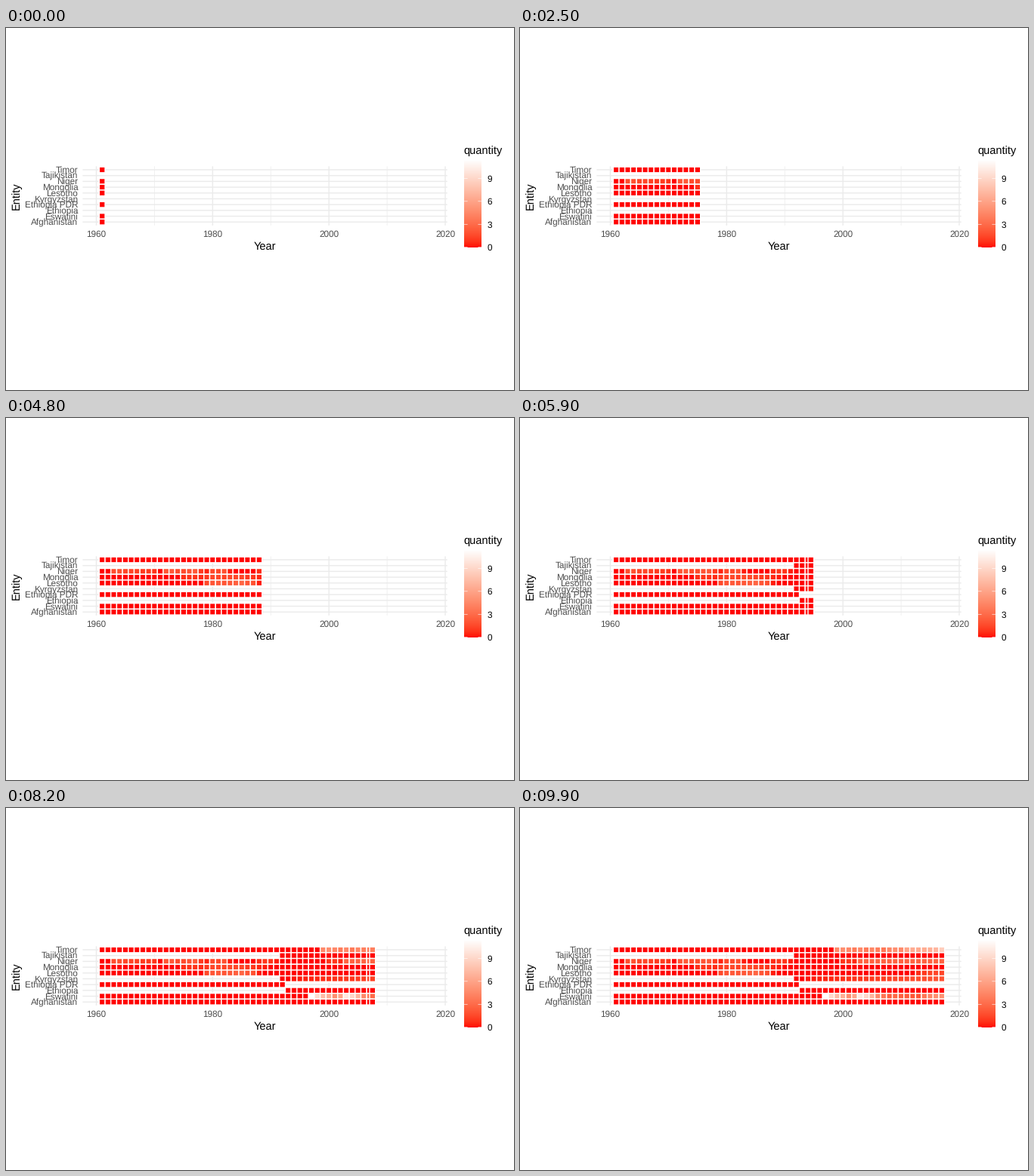
Animation, 672 px wide and 480 px high, one loop 10 s. Source, as a matplotlib script:

```python
import numpy as np
import matplotlib.pyplot as plt
from matplotlib.animation import FuncAnimation
from matplotlib.collections import LineCollection, PolyCollection

W, H, DPI = 672, 480, 96
FRAMES, INTERVAL = 100, 100
FIRST, LAST = 1961, 2017
CELL = 7.692            # pixels per year and per row
X1960, ROW_TOP = 119.5, 188.0
PANEL = (101.4, 583.7, 183.4, 261.8)
BAR = (606, 629, 290.7, 175.5)
TOP_VALUE = 11.35
LINE = 1.42

plt.rcParams["font.family"] = "Liberation Sans"
plt.rcParams["text.hinting"] = "none"

YEARS = np.arange(FIRST, LAST + 1)
ROWS = ["Timor", "Tajikistan", "Niger", "Mongolia", "Lesotho", "Kyrgyzstan",
        "Ethiopia PDR", "Ethiopia", "Eswatini", "Afghanistan"]
SPAN = {"Tajikistan": (1992, LAST), "Kyrgyzstan": (1992, LAST),
        "Ethiopia PDR": (FIRST, 1992), "Ethiopia": (1993, LAST)}

# Runs of yearly values, keyed by their first year; all other years are zero.
RUNS = {
    "Timor": {1999: [4.5, 4.8, 4.5, 3.8, 4.5, 3.8, 4.4, 4, 3.6, 4.4, 4.8,
                     4.6, 6, 6.4, 6.4, 6.5, 6.7, 7, 8.4]},
    "Niger": {1963: [1.7, 1.8, 1.4, 1.4, 1.2, 1, 1, .8],
              1972: [2, 2.2, 1.6, 1.6, 1.9, 2.1, 1, .4, 1.5, 1.5, 1.8, .3],
              1988: [.6, .9, .8, .3],
              2000: [.8, .9, .5] + [2.6] * 15},
    "Mongolia": {1975: [.7, .8, .8, .6, 1, 1.4, 1.5, 1.3, 1.5, 1.5, 1.4,
                        1, .9, .5, .3]},
    "Lesotho": {1979: [1.5, 2, 2.2, 2, 2.2, 2.5, 2.7, 2, 1.8, .3],
                2013: [.6, 1, 1.3, 1.4, 1.4]},
    "Kyrgyzstan": {1994: list(np.linspace(.2, 1.9, 24))},
    "Eswatini": {1997: [11.3, 9.2, 7.4, 6.6, 4.8, 6, 10, 9, 7, 4.5, 3.5,
                        2.5, 2.8, 2.5, 2.3, 2, 2, 3.6, 4.4, 4.8, 5]},
}


def make_series(name):
    values = np.zeros(len(YEARS))
    for start, run in RUNS.get(name, {}).items():
        values[start - FIRST:start - FIRST + len(run)] = run
    return values


SERIES = {name: make_series(name) for name in ROWS}


def shade(values):
    """Red to white, blended in CIE Lab."""
    t = np.clip(np.atleast_1d(values) / TOP_VALUE, 0, 1)[:, None]
    lab = (1 - t) * np.array([53.24, 80.09, 67.2]) + t * np.array([100, 0, 0])
    fy = (lab[:, 0] + 16) / 116
    f = np.stack([fy + lab[:, 1] / 500, fy, fy - lab[:, 2] / 200], axis=1)
    xyz = np.where(f > 6 / 29, f ** 3, 3 * (6 / 29) ** 2 * (f - 4 / 29))
    xyz = xyz * np.array([.95047, 1, 1.08883])
    to_rgb = np.array([[3.2406, -1.5372, -.4986],
                       [-.9689, 1.8758, .0415],
                       [.0557, -.2040, 1.0570]])
    lin = np.clip(xyz @ to_rgb.T, 0, 1)
    return np.where(lin > .0031308, 1.055 * lin ** (1 / 2.4) - .055, 12.92 * lin)


def px(n):
    return n * 72 / DPI


def year_x(year):
    return X1960 + (year - 1960) * CELL


def row_y(row):
    return ROW_TOP + row * CELL


def tile(year, row):
    x, y, h = year_x(year), row_y(row), CELL / 2
    return [(x - h, y - h), (x + h, y - h), (x + h, y + h), (x - h, y + h)]


fig = plt.figure(figsize=(W / DPI, H / DPI), dpi=DPI, facecolor="white")
ax = fig.add_axes([0, 0, 1, 1])


def label(x, y, s, size=11.73, color="black", ha="left", **kw):
    ax.text(x, y, s, fontsize=px(size), color=color, ha=ha,
            va="baseline", **kw)


def lines(segments, color, width, z):
    ax.add_collection(LineCollection(segments, colors=color, zorder=z,
                                     linewidths=px(width), capstyle="butt",
                                     snap=False), autolim=False)


def draw_panel():
    left, right, top, bottom = PANEL
    for years, width in ((range(1970, 2011, 20), LINE / 2),
                         (range(1960, 2021, 20), LINE)):
        lines([[(year_x(y), top), (year_x(y), bottom)] for y in years],
              "#EBEBEB", width, 1)
    lines([[(left, row_y(r)), (right, row_y(r))] for r in range(len(ROWS))],
          "#EBEBEB", LINE, 1)
    for r, name in enumerate(ROWS):
        label(95.2, row_y(r) + 4.3, name, color="#4D4D4D", ha="right")
    for year in range(1960, 2021, 20):
        label(year_x(year), 277, str(year), color="#4D4D4D", ha="center")
    label((left + right) / 2, 294, "Year", 14.67, ha="center")
    ax.text(18, (top + bottom) / 2, "Entity", fontsize=px(14.67), rotation=90,
            ha="right", va="center", rotation_mode="default").remove()
    ax.text(18, (top + bottom) / 2, "Entity", fontsize=px(14.67), rotation=90,
            ha="center", va="baseline", rotation_mode="anchor")


def draw_legend():
    left, right, bottom, top = BAR
    ramp = shade(np.linspace(TOP_VALUE, 0, 300))[:, None, :]
    ax.imshow(ramp, extent=(left, right, bottom, top), aspect="auto",
              interpolation="bilinear", zorder=2)
    label(left - .5, 167, "quantity", 14.67)
    tick = (right - left) / 5
    for v in (0, 3, 6, 9):
        y = bottom + (top - bottom) * v / TOP_VALUE
        lines([[(left, y), (left + tick, y)], [(right - tick, y), (right, y)]],
              "white", .6, 3)
        label(636.3, y + 4.3, str(v))


draw_panel()
draw_legend()
tiles = PolyCollection([], edgecolors="white", linewidths=px(LINE),
                       joinstyle="miter", snap=False, zorder=4)
ax.add_collection(tiles, autolim=False)
ax.set_xlim(0, W)
ax.set_ylim(H, 0)
ax.axis("off")

# Each year lands on a whole frame; frames in between sit halfway.
KEYS = np.round(np.arange(len(YEARS)) * (FRAMES - 1) / (len(YEARS) - 1))


def update(i):
    now = np.interp(i, KEYS, YEARS)
    verts, values = [], []
    for r, name in enumerate(ROWS):
        first, last = SPAN.get(name, (FIRST, LAST))
        for year in range(first, min(last, int(now)) + 1):
            verts.append(tile(year, r))
            values.append(SERIES[name][year - FIRST])
        if now % 1 and first <= now <= last:
            verts.append(tile(now, r))
            values.append(np.interp(now, YEARS, SERIES[name]))
    tiles.set_verts(verts)
    tiles.set_facecolor(shade(np.array(values)))
    return tiles,


anim = FuncAnimation(fig, update, frames=FRAMES, interval=INTERVAL,
                     repeat=True, repeat_delay=0, blit=False)
plt.show()
```
